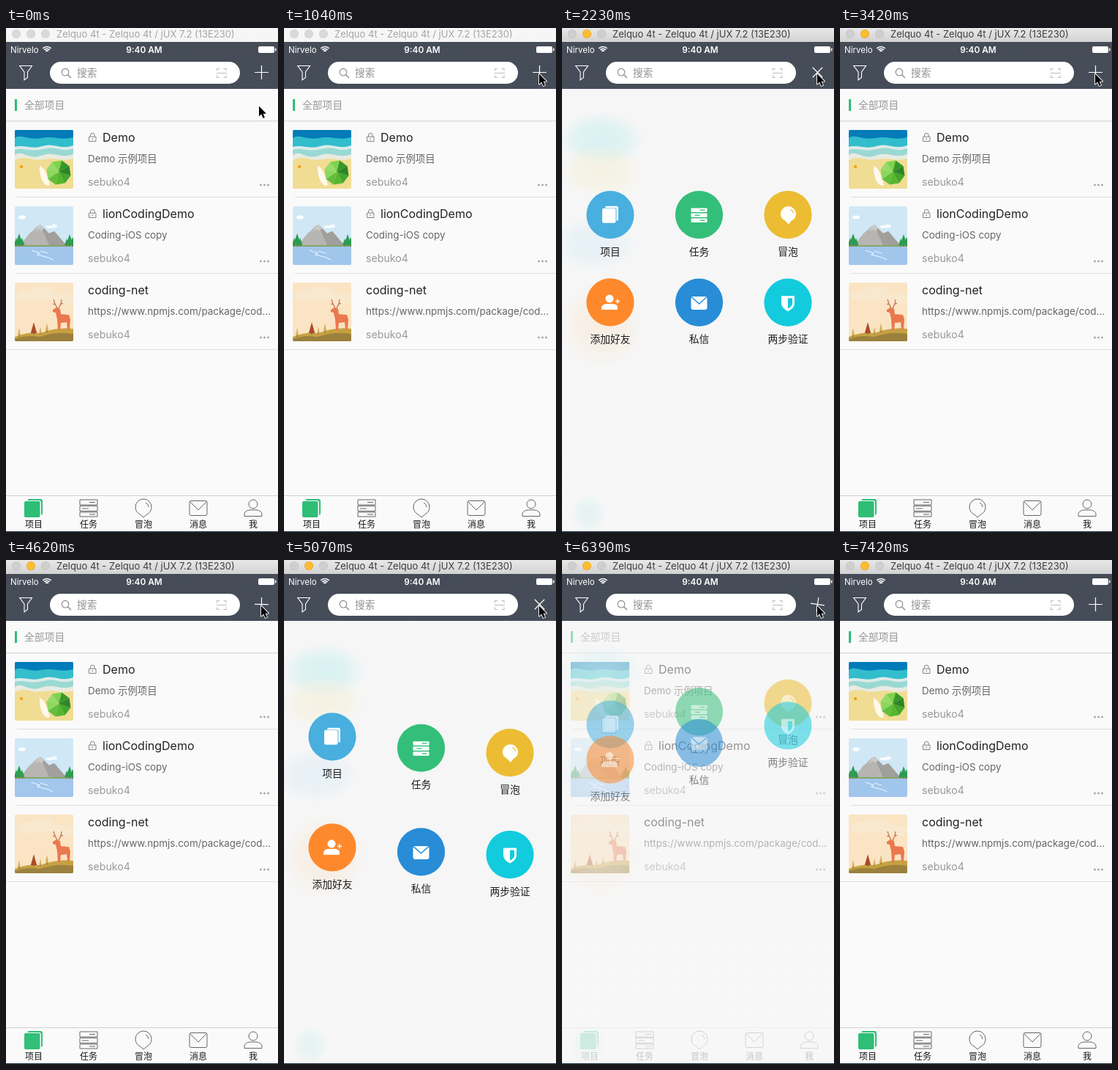
These frames come from a looping animation (372 by 687 pixels, 7.72 s). An HTML page with a canvas:

```html
<!DOCTYPE html>
<html lang="zh">
<head>
<meta charset="utf-8">
<title>Menu animation</title>
<style>
html, body { margin: 0; width: 100%; height: 100%; overflow: hidden; background: #fafafa; }
canvas { display: block; width: 372px; height: 687px; }
</style>
</head>
<body>
<canvas id="stage" width="372" height="687"></canvas>
<script>
const ctx = document.getElementById('stage').getContext('2d');
const FONT = 'Inter, "Noto Sans CJK SC", "Noto Sans CJK", sans-serif';
const LOOP = 7720;
const OPENS = [1340, 4620], CLOSES = [2970, 6240];
// Bursts of redraws: start, end, number of steps
const BURSTS = [[150, 1040, 7], [1340, 2530, 9], [2970, 3420, 4], [4620, 5800, 9], [6240, 7420, 9]];

const clamp = v => Math.max(0, Math.min(1, v));
const ease = v => { const k = clamp(v); return k * k * (3 - 2 * k); };
const mix = (a, b, k) => a + (b - a) * k;

function snap(t) {
  let held = 0;
  for (const [start, end, steps] of BURSTS) {
    if (t < start) break;
    const gap = (end - start) / (steps - 1);
    held = start + Math.min(steps - 1, Math.floor((t - start) / gap + 0.08)) * gap;
  }
  return held;
}

function rect(x, y, w, h, color) {
  ctx.fillStyle = color;
  ctx.fillRect(x, y, w, h);
}

function round(x, y, w, h, r, color) {
  ctx.beginPath();
  ctx.roundRect(x, y, w, h, r);
  ctx.fillStyle = color;
  ctx.fill();
}

function oval(x, y, rx, ry, color) {
  ctx.beginPath();
  ctx.ellipse(x, y, rx, ry, 0, 0, Math.PI * 2);
  ctx.fillStyle = color;
  ctx.fill();
}

function fill(d, color) {
  ctx.fillStyle = color;
  ctx.fill(new Path2D(d));
}

function line(d, color, width = 1) {
  ctx.strokeStyle = color;
  ctx.lineWidth = width;
  ctx.stroke(new Path2D(d));
}

function text(s, x, y, size, color, align = 'left', weight = 400) {
  ctx.font = `${weight} ${size}px ${FONT}`;
  ctx.textAlign = align;
  ctx.textBaseline = 'alphabetic';
  ctx.fillStyle = color;
  ctx.fillText(s, x, y);
}

function at(x, y, draw) {
  ctx.save();
  ctx.translate(x, y);
  draw();
  ctx.restore();
}

function titleBar(active) {
  const g = ctx.createLinearGradient(0, 0, 0, 19);
  g.addColorStop(0, active ? '#e9e8e9' : '#f7f7f7');
  g.addColorStop(1, active ? '#d3d2d3' : '#f5f5f5');
  rect(0, 0, 372, 19, g);
  [14, 34, 54].forEach((x, i) => {
    const lit = active && i === 1;
    oval(x, 8, 6, 6, lit ? '#dfa023' : active ? '#bfbfbf' : '#cccccc');
    oval(x, 8, 5.4, 5.4, lit ? '#fdbd2f' : active ? '#d0cfd0' : '#d9d9d9');
  });
  text('Zelquo 4t - Zelquo 4t / jUX 7.2 (13E230)', 69, 13, 13, active ? '#3d3d3d' : '#a5a5a5');
}

function navBar(turn) {
  const g = ctx.createLinearGradient(0, 19, 0, 83);
  g.addColorStop(0, '#464c57');
  g.addColorStop(1, '#454d59');
  rect(0, 19, 372, 64, g);
  text('Nirvelo', 6, 33.5, 11.5, '#fff');
  text('9:40 AM', 189, 33.5, 11.8, '#fff', 'center', 600);
  at(56, 33, () => {
    for (const r of [2.5, 5.2, 8]) {
      ctx.beginPath();
      ctx.arc(0, 0.5, r, -Math.PI * 0.75, -Math.PI * 0.25);
      ctx.strokeStyle = '#fff';
      ctx.lineWidth = 1.7;
      ctx.stroke();
    }
  });
  round(345, 25, 22, 9, 2, '#fff');
  round(368, 27.5, 1.5, 4, 1, '#fff');

  line('M18.7 51.5H35.5L29.5 60V67.5L25 71V60Z', '#fff', 1.1);
  round(60, 46, 260, 30, 15, '#fff');
  ctx.beginPath();
  ctx.arc(81, 60.2, 4.8, 0, Math.PI * 2);
  ctx.strokeStyle = '#858585';
  ctx.lineWidth = 1.1;
  ctx.stroke();
  line('M84.6 63.8L89 68', '#858585', 1.2);
  text('搜索', 97, 66.3, 13.7, '#929292');
  line('M288.5 58.5V55.5H292M297.5 55.5H301V58.5M288.5 64.5V67.5H292M297.5 67.5H301V64.5M288 61.5H302', '#bcbcbc', 1.1);
  at(349.5, 60.5, () => {
    ctx.rotate(turn * Math.PI / 4);
    line('M-9.5 0H9.5M0 -9.5V9.5', '#fff', 1.2);
  });
}

function beach() {
  rect(0, 0, 80, 80, '#f1dc93');
  fill('M0 0H80V39Q70 42 60 40T40 40T20 39T0 41Z', '#e9ebe2');
  fill('M0 0H80V33Q70 37 58 34T36 35T15 34T0 35Z', '#9ad9d3');
  fill('M0 0H80V25Q70 29 60 26T39 26T18 27T0 27Z', '#dcebe8');
  fill('M0 0H80V21Q70 25 58 22T38 22T18 23T0 23Z', '#32bdcc');
  fill('M0 0H80V10Q70 13 58 11T36 11T15 10T0 11Z', '#027bb9');
  fill('M34 49Q42 51 48 75Q43 78 38 70Q33 59 34 49Z', '#fff9ed');
  oval(9, 50, 2.2, 2.2, '#f0a322');
  const tones = ['#43a52b', '#55b72d', '#62bd3d', '#8ad85d', '#95db69', '#7fd24e', '#36982a', '#2b8526'];
  tones.forEach((color, i) => {
    const a = i * Math.PI / 4 + 0.25, b = a + Math.PI / 4;
    ctx.beginPath();
    ctx.moveTo(60, 57);
    ctx.lineTo(60 + 17 * Math.cos(a), 58 + 17 * Math.sin(a));
    ctx.lineTo(60 + 17 * Math.cos(b), 58 + 17 * Math.sin(b));
    ctx.fillStyle = color;
    ctx.fill();
  });
}

function pine(x, y, h, color, slim = 0.34) {
  fill(`M${x} ${y - h}L${x + h * slim} ${y}H${x - h * slim}Z`, color);
  rect(x - 0.5, y, 1, 2, '#735839');
}

function lake() {
  rect(0, 0, 80, 80, '#d0e8f6');
  oval(10, 15, 5, 2.5, '#fff');
  oval(48, 28, 6, 2, '#f5fbfe');
  oval(54, 27, 4, 2.5, '#f5fbfe');
  fill('M6 55L20 37L24 34L31 27L35 25L47 37L54 34L72 55Z', '#b7b5b1');
  fill('M35 25L47 37L54 34L72 55H48L42 42Z', '#a09f9b');
  fill('M31 27L35 25L40 30L36 34L33 31L28 35Z', '#c9c9c6');
  rect(0, 53, 80, 2, '#83a765');
  rect(0, 55, 80, 25, '#a1c6ec');
  line('M23 60L34 64L31 66L46 70L52 73M35 61L45 64', '#e5f3ff', 1.1);
  [[2, 10], [6, 16], [10, 10], [71, 9], [75, 15], [79, 11]].forEach(([x, h]) => pine(x, 53, h, '#2d9b51'));
}

function deer() {
  rect(0, 0, 80, 80, '#fae4c3');
  oval(18, 18, 16, 8, '#f8e8cd');
  oval(38, 15, 18, 10, '#f8e8cd');
  oval(65, 22, 16, 8, '#f8e8cd');
  fill('M0 74Q18 67 35 69Q58 60 80 63V80H0Z', '#c6a141');
  fill('M0 77Q16 71 34 74Q58 66 80 70V80H0Z', '#9b813d');
  pine(26, 69, 15, '#ac4928', 0.28);
  [[6, 72, 10], [35, 68, 8], [44, 66, 11]].forEach(([x, y, h]) => pine(x, y, h, '#d4b05c', 0.2));
  fill('M52 37L57 34L62 36L63 43L74 44L76 50L75 64H72L71 54L63 55L62 65H59L58 50L56 41L52 40Z', '#ea784e');
  line('M58 35L55 29L53 23M56 30L52 29M60 35L63 29L64 23M62 30L66 28', '#ca6740', 1.2);
}

const PROJECTS = [
  { name: 'Demo', info: 'Demo 示例项目', locked: true, art: beach },
  { name: 'lionCodingDemo', info: 'Coding-iOS copy', locked: true, art: lake },
  { name: 'coding-net', info: 'https://www.npmjs.com/package/cod…', art: deer }
];

function projectRow(project, i) {
  at(0, 139 + i * 104, () => {
    ctx.save();
    ctx.translate(12, 0);
    ctx.beginPath();
    ctx.roundRect(0, 0, 80, 80, 2);
    ctx.clip();
    project.art();
    ctx.restore();
    if (project.locked) {
      line('M115.5 9V7Q115.5 4.3 118.3 4.3T121.1 7V9M113.5 9.2H123V15.5H113.5ZM118.2 11V13.5', '#858585', 1);
    }
    text(project.name, project.locked ? 132 : 112, 16, 16, '#222');
    text(project.info, 112, 44, 13.4, '#666');
    text('sebuko4', 112, 76, 14.2, '#999');
    [348.5, 353.5, 358.5].forEach(x => oval(x, 75, 1.4, 1.4, '#a5a5a5'));
  });
  const left = i < 2 ? 15 : 0;
  rect(left, 230 + i * 104, 372 - left, 1, '#dedede');
}

const TABS = [
  ['项目', ''],
  ['任务', 'M-12 -12H12V-5H-12ZM-12 -3.5H12V3.5H-12ZM-12 5H12V11H-12ZM1 -8.5H9M-9 0H0M1 8H9'],
  ['冒泡', 'M0 12L-4 8.5Q-11 5 -11 -2A11 11 0 0 1 11 -2Q11 5 4 8.5ZM3 -8Q7 -6 7 -2'],
  ['消息', 'M-10 -10.5H10Q12 -10.5 12 -8.5V7Q12 9.5 10 9.5H-10Q-12 9.5 -12 7V-8.5Q-12 -10.5 -10 -10.5ZM-11 -9L0 2L11 -9'],
  ['我', 'M-6 -6A6 6 0 1 1 6 -6A6 6 0 1 1 -6 -6M-12 10.5V7Q-11 3 -5 2H5Q11 3 12 7V10.5Z']
];

function listPage() {
  rect(0, 83, 372, 604, '#fafafa');
  rect(12, 97, 3, 16, '#2ebe76');
  text('全部项目', 25, 110, 13.8, '#999');
  rect(0, 126, 372, 1.5, '#dedede');
  PROJECTS.forEach(projectRow);
  rect(0, 637, 372, 1, '#d0d0d0');
  TABS.forEach(([label, path], i) => at(38 + i * 75, 655, () => {
    if (path) line(path, '#666', 1);
    else {
      round(-9, -13, 21, 22, 3, '#2ebe76');
      round(-13.5, -11, 23.5, 24, 3, '#fafafa');
      round(-13, -10, 21.5, 22, 2, '#2ebe76');
    }
    text(label, 0, 26.3, 12, '#151515', 'center');
  }));
}

function glow(x, y, rx, ry, rgb, alpha) {
  at(x, y, () => {
    ctx.scale(rx, ry);
    const g = ctx.createRadialGradient(0, 0, 0, 0, 0, 1);
    g.addColorStop(0, `rgba(${rgb},${alpha})`);
    g.addColorStop(0.6, `rgba(${rgb},${alpha * 0.65})`);
    g.addColorStop(1, `rgba(${rgb},0)`);
    oval(0, 0, 1, 1, g);
  });
}

function backdrop() {
  rect(0, 83, 372, 604, '#f6f6f6');
  const g = ctx.createLinearGradient(0, 440, 0, 687);
  g.addColorStop(0, 'rgba(249,249,249,0)');
  g.addColorStop(1, '#f7f7f7');
  rect(0, 440, 372, 247, g);
  glow(54, 152, 58, 38, '205,239,240', 0.75);
  glow(53, 195, 57, 36, '244,239,213', 0.65);
  glow(44, 294, 58, 37, '224,238,247', 0.75);
  glow(54, 405, 56, 58, '248,234,217', 0.7);
  glow(36, 662, 25, 27, '222,241,240', 0.75);
}

// Label, colour, start delay and white icon drawn around the circle centre
const MENU = [
  ['项目', '#49afdf', 92, color => {
    round(-7, -12, 18, 20, 2.5, '#fff');
    round(-11.5, -9.5, 20, 21.5, 2.5, color);
    round(-11, -9, 18.5, 20, 2, '#fff');
  }],
  ['任务', '#33bf79', 64, color => [-9, -2, 5].forEach((y, i) => {
    round(-11, y, 22, 5.5, 1, '#fff');
    rect(i === 1 ? -6 : 1, y + 2, 7, 1.3, color);
  })],
  ['冒泡', '#ecbd32', 48, color => {
    fill('M1 13L-4 8Q-10 5 -10 -1A10.5 10.5 0 0 1 11 -1Q11 5 5 8Z', '#fff');
    line('M3 -7Q7 -6 7.5 -2', color, 1.2);
  }],
  ['添加好友', '#fe892c', 35, () => {
    oval(-1, -5, 5.5, 5.5, '#fff');
    fill('M-12 10V7Q-11 2 -4 2H2Q10 2 10 7V10Z', '#fff');
    line('M7 -1.5H13M10 -4.5V1.5', '#fff', 1.5);
  }],
  ['私信', '#288cd6', 17, color => {
    round(-11, -8, 22, 18, 3, '#fff');
    line('M-10 -7L0 2L10 -7', color, 1.4);
  }],
  ['两步验证', '#12cbdd', 0, color => {
    fill('M-9 -9H9V2Q8 8 0 12Q-8 8 -9 2Z', '#fff');
    fill('M0 -6H6V2Q5 6 0 8Z', color);
  }]
];

function spring(ms) {
  if (ms <= 0) return 1;
  const s = ms / 1000, a = 8.8 * s;
  return Math.exp(-7.27 * s) * (Math.cos(a) + 0.826 * Math.sin(a));
}

function menuPage(openMs, closeMs, shown) {
  ctx.save();
  ctx.beginPath();
  ctx.rect(0, 83, 372, 604);
  ctx.clip();
  ctx.globalAlpha = shown;
  backdrop();
  MENU.forEach(([label, color, delay, icon], i) => {
    const row = Math.floor(i / 3), travel = 260 + row * 120;
    const exit = clamp((closeMs + 60 - delay) / 330);
    const lift = travel * (spring(openMs - 121 - delay) + exit * exit);
    at(66 + (i % 3) * 121.5, 256 + row * 120 - lift, () => {
      oval(0, 0, 32.6, 32.6, color);
      icon(color);
      text(label, 0, 55.2, 13.8, '#1c1c1c', 'center');
    });
  });
  ctx.restore();
}

function cursor(t) {
  if (t >= 7420) return;
  const arrive = ease((t - 150) / 890), leave = ease((t - 6680) / 590);
  const x = mix(mix(346, 349, arrive), 329, leave);
  const y = mix(mix(106.5, 62.5, arrive), 685.5, leave);
  at(x, y, () => {
    const arrow = 'M0 0V14L3.2 11L5.6 16.5L8 15.5L5.7 10.2H10Z';
    ctx.lineJoin = 'round';
    line(arrow, '#fff', 1.8);
    fill(arrow, '#000');
  });
}

function draw(t) {
  const n = t >= OPENS[1] ? 1 : 0;
  const openMs = t - OPENS[n], closeMs = t - CLOSES[n];
  const shown = openMs < 0 ? 0
    : closeMs < 0 ? ease((openMs + 10) / 220)
    : 1 - ease((closeMs + 80) / 480);
  const turn = openMs < 0 ? 0
    : closeMs < 0 ? ease((openMs + 10) / 220)
    : 1 - ease((closeMs + 40) / 260);
  listPage();
  if (shown > 0) menuPage(openMs, closeMs, shown);
  titleBar(t >= OPENS[0]);
  navBar(turn);
  rect(0, 686, 372, 1, '#1c2f45');
  cursor(t);
}

const began = performance.now();
function tick() {
  draw(snap((performance.now() - began) % LOOP));
  requestAnimationFrame(tick);
}
tick();
</script>
</body>
</html>
```
